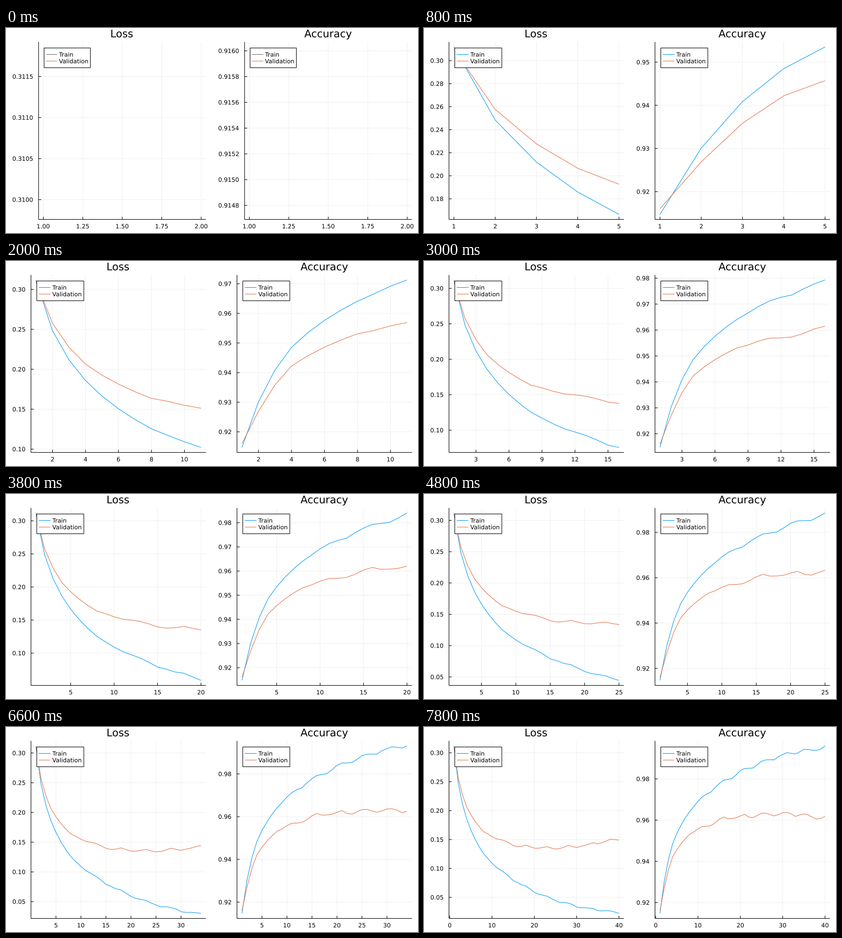
Animation, 768 px wide and 384 px high, one loop 8 s. Source, as a matplotlib script:

```python
import math

import matplotlib.pyplot as plt
import numpy as np
from matplotlib.animation import FuncAnimation
from matplotlib.patches import PathPatch, Rectangle
from matplotlib.textpath import TextPath
from matplotlib.transforms import Affine2D

W, H, DPI = 768, 384, 100
EPOCHS, STEP_MS = 40, 200
TOP, BOTTOM, RIGHT = 26.1, 358.6, 372.7
BLUE, ORANGE, GREY, GRID = "#009afa", "#e36f47", "#707070", "#f0f0f0"
PX = 72 / DPI
SMALL, LARGE = 8 / PX, 14 / PX

plt.rcParams["font.family"] = "DejaVu Sans"

rng = np.random.default_rng(4)
epoch = np.arange(1, EPOCHS + 1)
KNOTS = (1, 2, 4, 8, 16, 24, 32, 40)


def curve(amp, *levels):
    """Trend linear in log(epoch), plus a late wiggle peaking every 5 epochs."""
    trend = np.interp(np.log(epoch), np.log(KNOTS), levels)
    ramp = np.clip((epoch - 8) / 5, 0, 1)
    wave = np.cos(2 * np.pi * (epoch - 3) / 5) + rng.normal(0, .25, EPOCHS)
    return trend + amp * ramp * wave


LOSS = (
    curve(.0015, .31186, .2484, .1859, .1255, .0761, .0474, .0315, .0235),
    curve(.0020, .30982, .2576, .2065, .1636, .1390, .1346, .1395, .1515),
)
ACCURACY = (
    curve(-.0008, .91473, .9301, .9485, .9641, .9787, .9872, .9927, .9950),
    curve(-.0009, .91603, .9269, .9422, .9531, .9605, .9625, .9632, .9609),
)


def widen(lo, hi):
    pad = 0.03 * (hi - lo)
    return lo - pad, hi + pad


def nice_ticks(lo, hi):
    """Best-scoring round ticks (4 to 8 of them) and their decimals."""
    span = hi - lo
    top = math.ceil(math.log10(span))
    best = None
    for z in range(top, top - 3, -1):
        for q, nice in ((1, 1), (5, .9), (2, .7), (2.5, .5), (3, .2)):
            step = q * 10.0 ** z
            first, last = math.ceil(lo / step), math.floor(hi / step)
            n = last - first + 1
            if not 4 <= n <= 8:
                continue
            zero = lo <= step and math.ceil(hi / step) * step < 2 * span
            score = (.25 * (1 - abs(n - 5) / 5) + zero / 6
                     + .5 * span / ((n - 1) * step) + .25 * nice)
            rank = (round(score, 9), -n)
            if best is None or rank > best[0]:
                best = rank, step, first, last
    _, step, first, last = best
    decimals = 0
    while abs(round(step, decimals) - step) > 1e-6 * step:
        decimals += 1
    return [k * step for k in range(first, last + 1)], decimals


fig = plt.figure(figsize=(W / DPI, H / DPI), dpi=DPI, facecolor="white")
ax = fig.add_axes([0, 0, 1, 1])


def line(xs, ys, color, z):
    ax.plot(xs, ys, color=color, lw=PX, zorder=z, snap=False,
            solid_capstyle="butt")


def text(x, y, s, align=.5, size=SMALL):
    """Outlined text with its baseline at y; align 0 is left, 1 is right."""
    path = TextPath((0, 0), s, size=size)
    box = path.get_extents()
    place = Affine2D().scale(1, -1).translate(
        x - box.x0 - align * box.width, y)
    ax.add_patch(PathPatch(path.transformed(place), fc="black", lw=0,
                           zorder=6, snap=False))


def legend(left, width, colors):
    x0, tx = left + .033 * width, left + .122 * width
    x1 = tx + 55.7 + .009 * width
    ax.add_patch(Rectangle((x0, 37.4), x1 - x0, 37, fc="white", ec="black",
                           lw=PX, zorder=4, snap=False))
    for y, label, color in zip((49.5, 62), ("Train", "Validation"), colors):
        line([left + .0444 * width, left + .1115 * width], [y, y], color, 5)
        text(tx, y + 4.1, label, 0)


def panel(title, curves, n, offset):
    shown = [c[:n] for c in curves]
    xlo, xhi = widen(1, max(n, 2))
    ylo, yhi = widen(np.min(shown), np.max(shown))
    xticks, xdec = nice_ticks(xlo, xhi)
    yticks, ydec = nice_ticks(ylo, yhi)

    # wider y labels push the axis to the right
    left = offset + 46.6 + 7.07 * (ydec - 2)
    right = offset + RIGHT
    width = right - left

    def px(x):
        return left + (x - xlo) / (xhi - xlo) * width

    def py(y):
        return BOTTOM - (y - ylo) / (yhi - ylo) * (BOTTOM - TOP)

    for t in xticks:
        x = px(t)
        line([x, x], [TOP, BOTTOM], GRID, 1)
        line([x, x], [BOTTOM - 5, BOTTOM], "black", 3)
        text(x, 375.4, f"{t:.{xdec}f}")
    for t in yticks:
        y = py(t)
        line([left, right], [y, y], GRID, 1)
        line([left, left + 5], [y, y], "black", 3)
        text(left - 11, y + 4.1, f"{t:.{ydec}f}", 1)
    line([left, left], [TOP, BOTTOM], "black", 3)
    line([left, right], [BOTTOM, BOTTOM], "black", 3)

    colors = (BLUE if n > 1 else GREY, ORANGE)
    if n > 1:
        for c, color in zip(shown, colors):
            line(px(epoch[:n]), py(c), color, 2)
    legend(left, width, colors)
    text((left + right) / 2 - .5, 17.4, title, size=LARGE)


def draw(i):
    ax.clear()
    ax.set_axis_off()
    ax.set_xlim(0, W)
    ax.set_ylim(H, 0)
    panel("Loss", LOSS, i + 1, 0)
    panel("Accuracy", ACCURACY, i + 1, W / 2)
    return []


anim = FuncAnimation(fig, draw, frames=EPOCHS, interval=STEP_MS,
                     repeat=True, repeat_delay=0)
plt.show()
```
